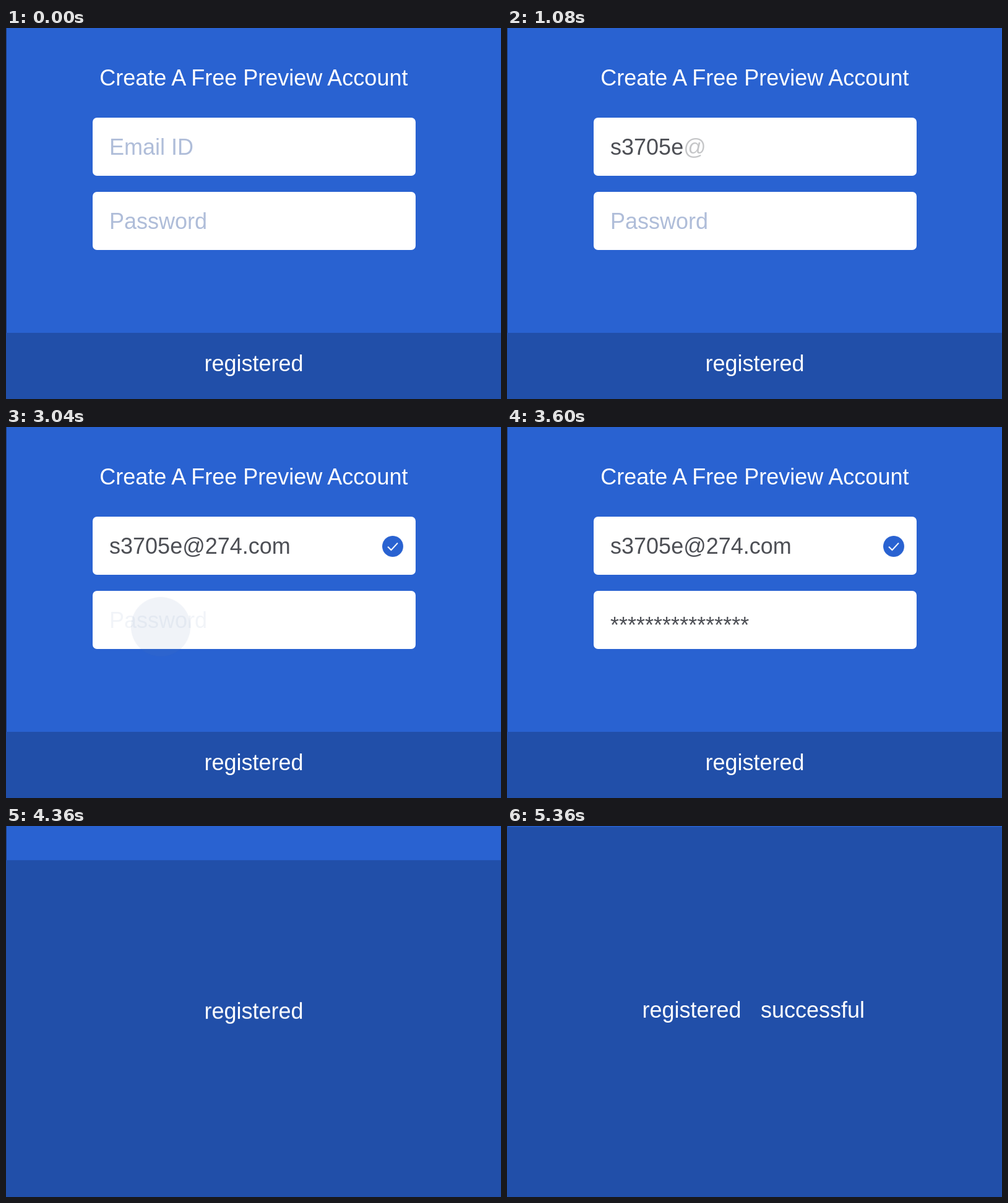
An HTML page that plays this animation: 800 px wide and 600 px high, repeating every 6.72 s.

```html
<!DOCTYPE html>
<html lang="en">
<head>
<meta charset="utf-8">
<title>Create account</title>
<style>
  html, body { margin: 0; width: 100%; height: 100%; overflow: hidden; background: #2962d1; }
  svg { display: block; width: 800px; height: 600px; }
  text { font: 36px "Liberation Sans", Arial, sans-serif; fill: #fff; white-space: pre; }
  .field { fill: #fff; }
  .hint { fill: #afbdd9; }
  .typed { fill: #4d4f55; }
  .tap { fill: #5b78b0; opacity: 0; transform-box: fill-box; transform-origin: center; }
  #check { transform-box: fill-box; transform-origin: center; }
</style>
</head>
<body>
<svg viewBox="0 0 800 600">
  <rect width="800" height="600" fill="#2962d1"/>
  <rect width="1" height="600" fill="#1c3a78"/>
  <text x="151.2" y="93">Create A Free Preview Account</text>

  <rect class="field" x="140" y="145" width="522" height="94" rx="7"/>
  <text class="hint" id="mailHint" x="167" y="205">Email ID</text>
  <text class="typed" id="mail" x="167" y="205">s3705e@274.com</text>
  <g id="check">
    <circle cx="625" cy="193" r="17" fill="#2962d1"/>
    <path d="M617 193.5l5.5 5.5 10.5-11.500" fill="none" stroke="#fff" stroke-width="2"/>
  </g>

  <rect class="field" x="140" y="265" width="522" height="94" rx="7"/>
  <text class="hint" id="passHint" x="167" y="325">Password</text>
  <text class="typed" id="pass" x="167" y="333">****************</text>

  <circle class="tap" id="mailTap" cx="278" cy="203" r="43"/>
  <circle class="tap" id="passTap" cx="250" cy="323" r="43"/>

  <rect id="panel" y="493" width="800" height="610" fill="#214fa9"/>
  <g id="rise"><text id="label" x="320.5" y="554.600">registered</text></g>
  <text id="done" x="410" y="309.600">successful</text>
</svg>
<script>
const LOOP = 6720;
const $ = id => document.getElementById(id);

// steps: [ms, value, easing towards the next step]
function play(el, prop, steps) {
  const first = steps[0], last = steps[steps.length - 1];
  const all = [[0, first[1]], ...steps, [LOOP, last[1]]];
  const frames = all.map(([ms, value, easing = 'linear']) =>
    ({ offset: ms / LOOP, [prop]: value, easing }));
  el.animate(frames, { duration: LOOP, iterations: Infinity }).startTime = 0;
}

// reveals one letter after another, each fading in over its own slot
function type(el, start, slot) {
  const letters = [...el.textContent];
  el.textContent = '';
  letters.forEach((ch, i) => {
    const span = document.createElementNS('http://www.w3.org/2000/svg', 'tspan');
    span.textContent = ch;
    el.append(span);
    const at = start + i * slot;
    play(span, 'fillOpacity', [[at, 0], [at + slot, 1]]);
  });
}

function tap(el, show, press, end, grow) {
  play(el, 'opacity', [[show - 1, 0], [show, 0.12], [show + 40, 0.2], [press, 0.2], [end, 0]]);
  play(el, 'transform', [[press, 'scale(1)', 'ease-out'], [end, `scale(${grow})`]]);
}

tap($('mailTap'), 200, 480, 820, 1.26);
play($('mailHint'), 'opacity', [[520, 1], [800, 0]]);
type($('mail'), 828, 40);
play($('check'), 'transform', [
  [1600, 'scale(0)', 'ease-out'],
  [1820, 'scale(1.38)', 'ease-in-out'],
  [2080, 'scale(1)']
]);

tap($('passTap'), 2560, 2800, 3240, 1.16);
play($('passHint'), 'opacity', [[2840, 1], [3080, 0]]);
type($('pass'), 3100, 31);

play($('panel'), 'transform', [
  [3760, 'translateY(0px)', 'cubic-bezier(.76, 0, 0, 1)'],
  [4800, 'translateY(-491.5px)']
]);
play($('rise'), 'transform', [
  [3760, 'translateY(0px)', 'cubic-bezier(.845, 0, .56, 1)'],
  [4400, 'translateY(-245px)']
]);
play($('label'), 'transform', [
  [4400, 'translateX(0px)', 'cubic-bezier(.5, 0, .2, 1)'],
  [4800, 'translateX(-102px)']
]);
type($('done'), 4940, 42);
</script>
</body>
</html>
```
